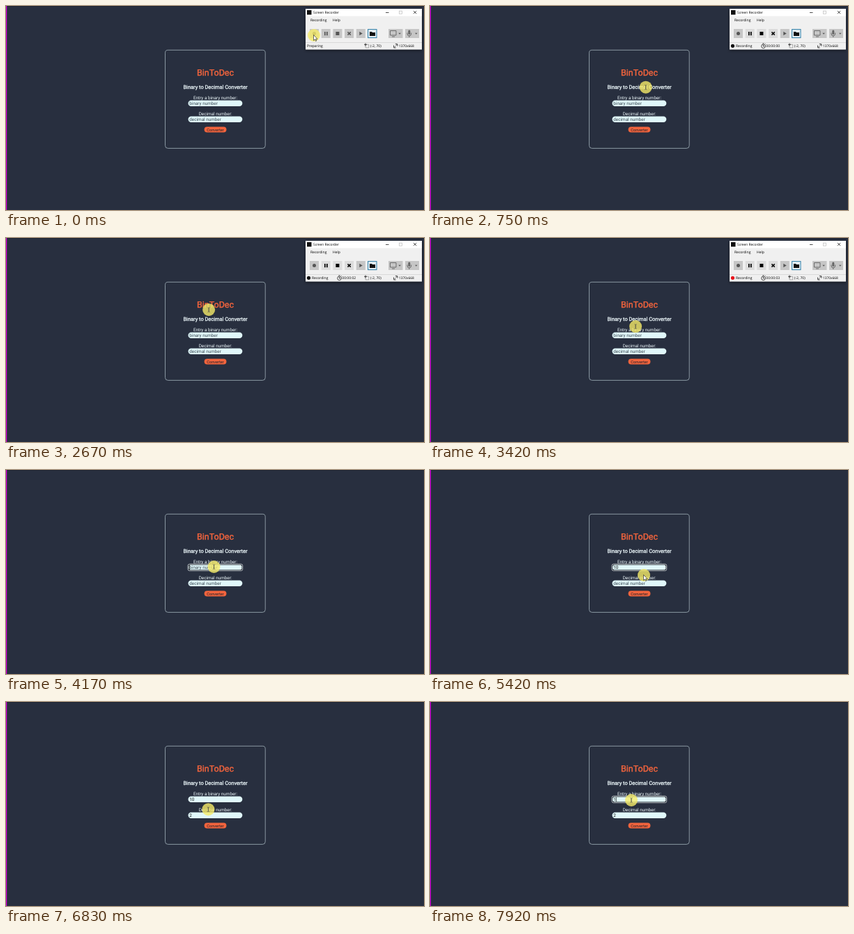
These frames come from a looping animation (600x293 px, 8 s). An HTML page:

```html
<!DOCTYPE html>
<html lang="en">
<head>
<meta charset="utf-8">
<title>Binary to Decimal Converter</title>
<style>
  html, body { margin: 0; width: 100%; height: 100%; overflow: hidden; background: #282f3f; }
  svg { display: block; width: 100vw; height: 100vh; text-rendering: geometricPrecision; }
  .page { font: 6.35px Roboto, sans-serif; }
  .app { font: 5px "Open Sans", sans-serif; }
  .center { text-anchor: middle; fill: #eef9fc; }
  .title { font-size: 12.5px; fill: #f2643d; stroke: #f2643d; stroke-width: .4; }
  .subtitle { font-size: 7.45px; stroke: #eef9fc; stroke-width: .28; }
  .field { fill: #e0f7fa; }
  .line { fill: none; stroke: #222; stroke-width: .8; }
</style>
</head>
<body>
<svg viewBox="0 0 600 293" preserveAspectRatio="none">
  <defs>
    <filter id="shadow" x="-10%" y="-20%" width="120%" height="150%">
      <feDropShadow dx="0" dy="1.5" stdDeviation="2" flood-opacity=".5"/>
    </filter>
  </defs>
  <rect width="600" height="293" fill="#282f3f"/>
  <rect width="600" height="1" fill="#1e2430"/>
  <rect width="1.2" height="293" fill="#d800dc"/>

  <g class="page">
    <rect x="228.5" y="63.3" width="143.7" height="141.1" rx="4" fill="none" stroke="#b4c4cc" stroke-width=".7"/>
    <text class="center title" x="300.5" y="100">BinToDec</text>
    <text class="center subtitle" x="300.5" y="118.5">Binary to Decimal Converter</text>
    <text class="center" x="300.5" y="134">Entry a binary number:</text>
    <text class="center" x="300.5" y="157">Decimal number:</text>
    <rect class="field" x="261.5" y="135.5" width="77.8" height="8.6" rx="4.2"/>
    <rect class="field" x="261.5" y="158.4" width="77.8" height="8.6" rx="4.2"/>
    <g id="focus" fill="none">
      <rect x="261.9" y="135.9" width="77" height="8" rx="2.2" stroke="#10131a" stroke-width=".9"/>
      <rect x="261.1" y="135.1" width="78.6" height="9.6" rx="2.4" stroke="#f4f8fa" stroke-width=".7"/>
    </g>
    <text id="binary" x="263.3" y="142"></text>
    <text id="decimal" x="263.3" y="165"></text>
    <rect id="caret" y="136.7" width=".7" height="6.3" fill="#111"/>
    <rect id="button" x="284.6" y="173.6" width="31.8" height="8" rx="4"/>
    <text x="300.5" y="179.6" text-anchor="middle" fill="#1c1f29" style="font-size:5.6px">Converter</text>
  </g>

  <g id="recorder" class="app">
    <rect x="430" y="4" width="167" height="58.5" fill="#f0f0f0" filter="url(#shadow)"/>
    <rect x="430" y="4" width="167" height="10.5" fill="#fff"/>
    <rect x="432" y="6" width="6.5" height="6.5" fill="#111"/>
    <text x="441" y="11.3" style="font-size:4.85px">Screen Recorder</text>
    <path class="line" d="M545 9.5h4.5M585 7l4.2 4.2m0-4.2l-4.2 4.2"/>
    <rect class="line" x="564.5" y="7.2" width="4" height="4" style="stroke:#c4c4c4"/>
    <text x="437" y="22">Recording</text>
    <text x="469" y="22">Help</text>
    <g id="tools"></g>
    <rect x="519.6" y="33.6" width="12.4" height="12" fill="#e4eef4" stroke="#2b7ca5"/>
    <path d="M522 37h3l1 1h4v5h-8z" fill="#111"/>
    <g fill="#c6c6c6"><rect x="549" y="33" width="20.5" height="13"/><rect x="573" y="33" width="20" height="13"/></g>
    <path class="line" d="M551.5 35.5h8.5v6.5h-8.5zM554 44h4M576 38.5v1.5a2.8 2.8 0 0 0 5.6 0v-1.5M578.8 43v2" style="stroke:#555"/>
    <rect x="577.3" y="34.5" width="3" height="6.5" rx="1.5" fill="#666"/>
    <path d="M563.3 38.7h3.6l-1.8 2zM587 38.7h3.6l-1.8 2z" fill="#555"/>
    <path d="M430 52.5h167" stroke="#d4d4d4" stroke-width=".8"/>
    <text id="status" y="59.2"></text>
    <g id="live">
      <circle id="dot" cx="434.5" cy="57.3" r="2.6"/>
      <circle class="line" cx="478.5" cy="57.8" r="2.8"/>
      <path class="line" d="M477.3 54h2.4M478.5 56v2h1.5M481 55l.7-.7"/>
      <text id="timer" x="482.3" y="59.2"></text>
    </g>
    <rect class="line" x="516" y="55.3" width="4.8" height="4.6" stroke-dasharray="1 .8" style="stroke:#555"/>
    <path class="line" d="M514 55.3h4M516 53.5v4"/>
    <text x="523" y="59.2">(-2, 70)</text>
    <path class="line" d="M556.5 56.5v3.5h3.5M558.8 54.5h3.2v3.2M557 59.7l4.7-4.8" stroke-dasharray="3 .6"/>
    <text x="564" y="59.2" style="font-size:4.8px">1370x668</text>
  </g>

  <g id="pointer">
    <circle r="9" fill="#f5eb69" fill-opacity=".8"/>
    <path id="arrow" d="M-.5-.5v8l1.9-1.7 1.2 2.7 1.2-.5-1.2-2.6h2.4z" fill="#fff" stroke="#111" stroke-width=".6"/>
    <path id="beam" d="M-1.6-3.2q1.6 0 1.6 1v4.6q0 1-1.6 1M1.6-3.2q-1.6 0-1.6 1v4.6q0 1 1.6 1" fill="none" stroke="#444" stroke-width=".6"/>
    <path id="hand" d="M-.4 1q1-1 1.7 0v3l3 .8q1 .4.8 1.5l-.5 3.7h-4l-2.5-3.3q-.2-1.2 1.5-.2z" fill="#fff" stroke="#111" stroke-width=".6"/>
  </g>
</svg>
<script>
const $ = id => document.getElementById(id);
const show = (id, on) => $(id).setAttribute('visibility', on ? 'inherit' : 'hidden');
const within = (v, low, high) => v >= low && v <= high;

const LOOP = 8, FPS = 12, TRAVEL = 0.25;
const DIGIT_WIDTH = 6.35 * 0.562;

// All times in seconds
const RECORD = 0.33, FOCUS = 4.16, TYPE_ONE = 4.66, TYPE_ZERO = 4.91,
      CLICK = 6.08, RESULT = 6.41, REFOCUS = 7.33, ERASE = 7.91;

// Pointer stops: arrival time, x, y
const stops = [
  [0.1, 442, 42], [0.16, 419, 48], [0.41, 294, 113], [0.66, 318, 101], [0.91, 290, 154],
  [1.33, 290, 118], [1.5, 311, 106], [2, 283, 98], [2.41, 288, 110], [2.66, 291, 103],
  [2.83, 319, 98], [3.25, 283, 100], [3.41, 295, 127], [3.58, 319, 136], [3.91, 298.5, 139],
  [5.41, 307, 151], [5.83, 298.5, 175.5], [6.91, 288, 148], [7.16, 289, 141]
];

const icons = [
  'M4 6.5a2.5 2.5 0 1 1 5 0a2.5 2.5 0 1 1-5 0',
  'M4.3 4h1.7v5.2h-1.7zM7.3 4h1.7v5.2h-1.7z',
  'M4 4h5v5h-5z',
  'M3.8 5l1.2-1.2 1.5 1.6 1.5-1.6 1.2 1.2-1.6 1.5 1.6 1.5-1.2 1.2-1.5-1.6-1.5 1.6-1.2-1.2 1.6-1.5z',
  'M4.5 3.8l4.5 2.7-4.5 2.7z'
];
$('tools').innerHTML = icons.map((icon, i) =>
  `<g transform="translate(${436 + i * 16.7} 33)"><rect width="13" height="13"/><path d="${icon}"/></g>`).join('');

// The pointer rests at each stop and eases to the next one just before its arrival time
function pointerAt(t) {
  const next = stops.findIndex(stop => stop[0] > t);
  if (next === 0) return stops[0].slice(1);
  if (next < 0) return stops.at(-1).slice(1);
  const [left, x0, y0] = stops[next - 1], [arrive, x1, y1] = stops[next];
  const travel = Math.min(TRAVEL, arrive - left);
  const k = Math.max(0, 1 - (arrive - t) / travel);
  const ease = k * k * (3 - 2 * k);
  return [x0 + (x1 - x0) * ease, y0 + (y1 - y0) * ease];
}

function drawPointer(t) {
  const [x, y] = pointerAt(t);
  const overForm = within(x, 260, 340);
  const hand = overForm && within(y, 172, 183);
  const beam = overForm && [[87, 105], [111, 121], [126, 145], [152, 167]].some(row => within(y, ...row));
  $('pointer').setAttribute('transform', `translate(${x} ${y})`);
  show('hand', hand);
  show('beam', beam);
  show('arrow', !hand && !beam);
  $('button').setAttribute('fill', hand ? '#ff7747' : '#f2643d');
}

function drawField(id, value, hint) {
  $(id).textContent = value || hint;
  $(id).setAttribute('fill', value ? '#111' : '#3f4c55');
}

function drawForm(t) {
  const value = t < TYPE_ONE ? '' : within(t, TYPE_ZERO, ERASE) ? '10' : '1';
  const focused = within(t, FOCUS, CLICK) || t >= REFOCUS;
  const lastInput = [FOCUS, TYPE_ONE, TYPE_ZERO, REFOCUS, ERASE].findLast(time => time <= t);
  drawField('binary', value, 'binary number');
  drawField('decimal', t >= RESULT ? '2' : '', 'decimal number');
  show('focus', focused);
  show('caret', focused && (t - lastInput) % 1 < 0.5);
  $('caret').setAttribute('x', 263.3 + value.length * DIGIT_WIDTH);
}

function drawRecorder(t) {
  const live = t >= RECORD;
  const seconds = Math.max(0, Math.floor(t - RECORD));
  show('recorder', t < FOCUS);
  show('live', live);
  $('status').textContent = live ? 'Recording' : 'Preparing';
  $('status').setAttribute('x', live ? 439 : 432);
  $('timer').textContent = '00:00:0' + seconds;
  $('dot').setAttribute('fill', seconds % 2 ? '#e8141c' : '#111');
  [...$('tools').children].forEach(({ children: [face, icon] }, i) => {
    const enabled = live && within(i, 1, 3);
    face.setAttribute('fill', enabled ? '#dcdcdc' : '#c6c6c6');
    icon.setAttribute('fill', enabled ? '#000' : '#555');
  });
}

function render(ms) {
  const t = Math.floor((ms + 5) / 1000 * FPS) / FPS % LOOP;
  drawRecorder(t);
  drawForm(t);
  drawPointer(t);
}

let start;
function tick(now) {
  start ??= now;
  render(now - start);
  requestAnimationFrame(tick);
}
render(0);
requestAnimationFrame(tick);
</script>
</body>
</html>
```
